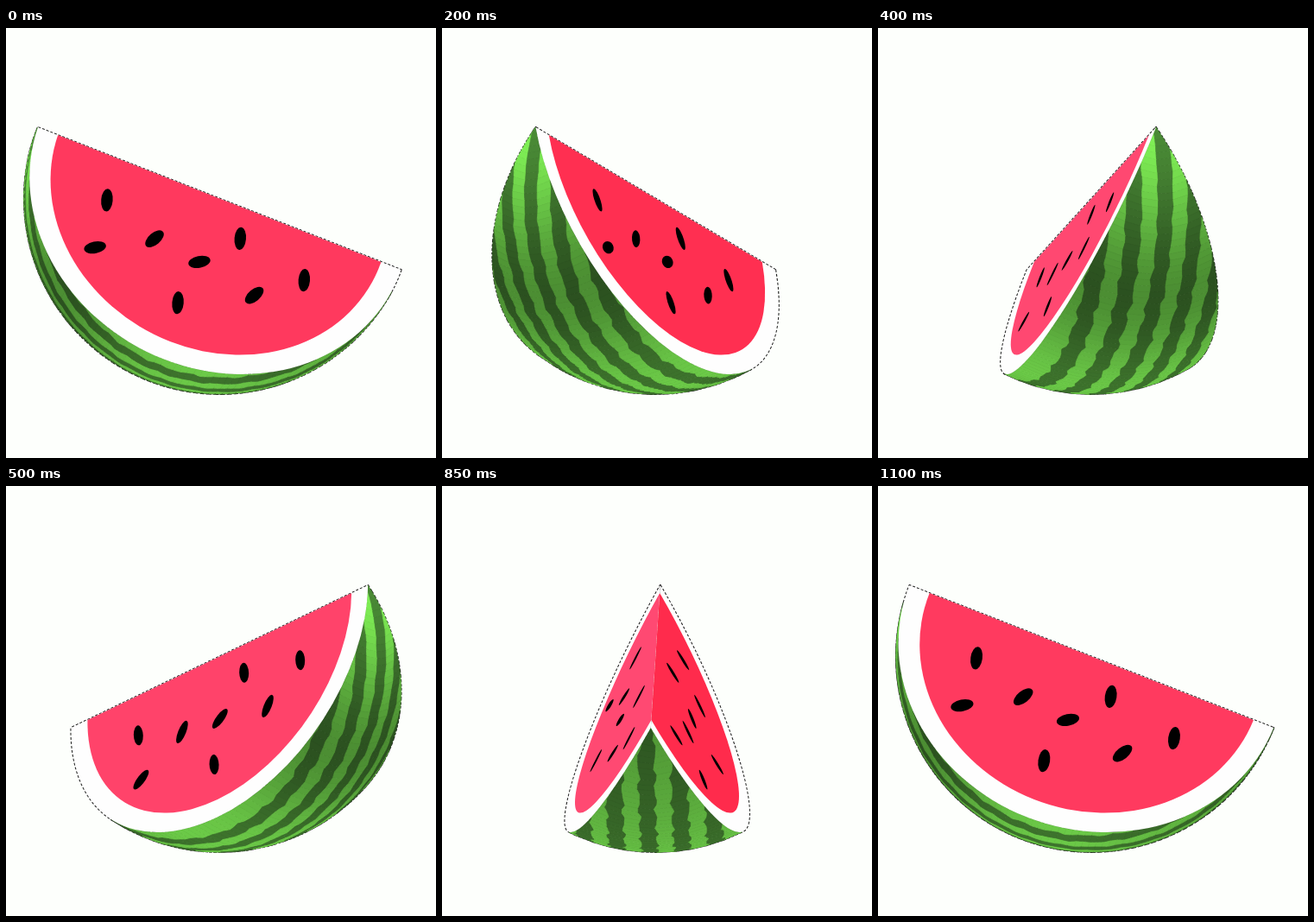
Write an HTML page with a canvas that moves like this. It is 498x498 px and loops after 1.15 s.

```html
<!DOCTYPE html>
<html>
<head>
<meta charset="utf-8">
<title>Turning watermelon slice</title>
<style>
html, body { margin: 0; width: 100%; height: 100%; overflow: hidden; background: #fdfffc; }
canvas { display: block; }
</style>
</head>
<body>
<canvas id="stage" width="498" height="498"></canvas>
<script>
const ctx = document.getElementById('stage').getContext('2d');
const { sin, cos, tan, asin, exp, min, max, round, PI } = Math;
const RAD = PI / 180;

const CX = 247.3, CY = 197.5;       // middle of the straight edge
const RIM = 226.5, FLESH = 201.5;   // outer and red radius
const TILT = 21.36 * RAD;           // slope of the straight edge
const HALF = 28.1 * RAD;            // half the wedge angle
const STEP = 50, STEPS = 23;

// Seeds of one face: along the straight edge, away from it, lean.
// The other face is its mirror image.
const UPRIGHT = 76 * RAD, FLAT = -33 * RAD, SLANT = -60 * RAD;
const SEEDS = [
  [-123, 50, UPRIGHT], [-118, 107, FLAT], [-56, 72, SLANT], [38, 35, UPRIGHT],
  [2, 78, FLAT], [75, 91, SLANT], [124, 53, UPRIGHT], [-6, 132, UPRIGHT]
];

// Starts slowly, then settles at an even speed
function angleAt(step) {
  return (4.3 + 18.2 * step - 46 * (1 - exp(-step / 4.2))) * RAD;
}

// Skin patches: s runs from the high tip to the low one, stripes lie side by side in depth
const SEGMENTS = 90, BANDS = 11;

function bandEdge(j, s) {
  if (j === 0) return -HALF;
  if (j === BANDS) return HALF;
  const stripe = (j - 1) >> 1;
  const wave = 1.7 * min(1, s) * (sin(40 * s + 2 * stripe) + 0.6 * sin(67 * s + 1.7 * j));
  const depth = 6 + 38 * (stripe - 2) + (j % 2 ? -9.5 : 9.5) + wave;
  const limit = sin(HALF);
  return asin(max(-limit, min(limit, depth / (RIM * sin(s)))));
}

function skinPoint(j, i) {
  const s = PI * i / SEGMENTS, psi = bandEdge(j, s);
  const along = RIM * cos(s), out = RIM * sin(s), down = out * cos(psi);
  return [
    -along * cos(TILT) - down * sin(TILT),
    -along * sin(TILT) + down * cos(TILT),
    out * sin(psi)
  ];
}

function skinColor(dark, s) {
  const bump = (at, width) => exp(-(((s - at) / width) ** 2));
  const shade = 1 + 0.2 * bump(0, 0.4) - 0.3 * bump(0.9, 0.45) - 0.26 * max(0, (s - 1.8) / 1.34);
  const base = dark ? [62, 116, 45] : [108, 203, 72];
  return `rgb(${base.map(c => round(c * shade))})`;
}

const patches = [];
for (let i = 0; i < SEGMENTS; i++) {
  for (let j = 0; j < BANDS; j++) {
    patches.push({
      color: skinColor(j % 2, PI * (i + 0.5) / SEGMENTS),
      corners: [skinPoint(j, i), skinPoint(j + 1, i), skinPoint(j + 1, i + 1), skinPoint(j, i + 1)]
    });
  }
}

// Positive when the patch faces the viewer
function area([a, b, c, d]) {
  return (c[0] - a[0]) * (d[1] - b[1]) - (d[0] - b[0]) * (c[1] - a[1]);
}

function tracePatch(q) {
  q.forEach(([x, y], k) => k ? ctx.lineTo(x, y) : ctx.moveTo(x, y));
  ctx.closePath();
}

// A face is flat, so its projection is one affine map
function enterFace(side, turn) {
  const k = side * tan(HALF) * sin(turn);
  ctx.setTransform(cos(turn) - k * sin(TILT), 0, k * cos(TILT), 1, CX, CY);
  ctx.rotate(TILT);
  ctx.scale(side, 1);
}

function halfDisc(side, turn, radius) {
  enterFace(side, turn);
  ctx.beginPath();
  ctx.ellipse(0, 0, radius, radius * cos(HALF), 0, 0, PI);
  ctx.closePath();
  ctx.resetTransform();
}

function drawFace(side, turn) {
  const light = side * sin(turn);
  halfDisc(side, turn, RIM);
  ctx.fillStyle = '#fefefe';
  ctx.fill();
  halfDisc(side, turn, FLESH);
  ctx.fillStyle = `rgb(255,${round(58 - 15 * light)},${round(95 - 19 * light)})`;
  ctx.fill();
  enterFace(side, turn);
  ctx.fillStyle = '#000';
  for (const [x, y, lean] of SEEDS) {
    ctx.beginPath();
    ctx.ellipse(x, y, 13.2, 6.8, lean, 0, 2 * PI);
    ctx.fill();
  }
  ctx.resetTransform();
}

function draw(turn) {
  const c = cos(turn), s = sin(turn);
  const skin = patches
    .map(p => ({ color: p.color, q: p.corners.map(([x, y, z]) => [CX + x * c + z * s, CY + y]) }))
    .filter(p => area(p.q) > 0);
  const faces = [1, -1].filter(side => side * c > tan(HALF) * sin(TILT) * s);

  ctx.fillStyle = '#fdfffc';
  ctx.fillRect(0, 0, 498, 498);

  // Broken dark outline; the fills hide its inner half
  ctx.lineJoin = 'round';
  ctx.lineWidth = 2;
  ctx.strokeStyle = '#222';
  ctx.setLineDash([3, 2]);
  ctx.beginPath();
  skin.forEach(p => tracePatch(p.q));
  ctx.stroke();
  for (const side of faces) {
    halfDisc(side, turn, RIM);
    ctx.stroke();
  }
  ctx.setLineDash([]);

  ctx.lineWidth = 0.7;
  for (const p of skin) {
    ctx.fillStyle = ctx.strokeStyle = p.color;
    ctx.beginPath();
    tracePatch(p.q);
    ctx.fill();
    ctx.stroke();
  }
  faces.forEach(side => drawFace(side, turn));
}

const start = performance.now();
let shown = -1;

function tick() {
  const step = Math.floor((performance.now() - start) / STEP) % STEPS;
  if (step !== shown) draw(angleAt(shown = step));
  requestAnimationFrame(tick);
}
tick();
</script>
</body>
</html>
```
